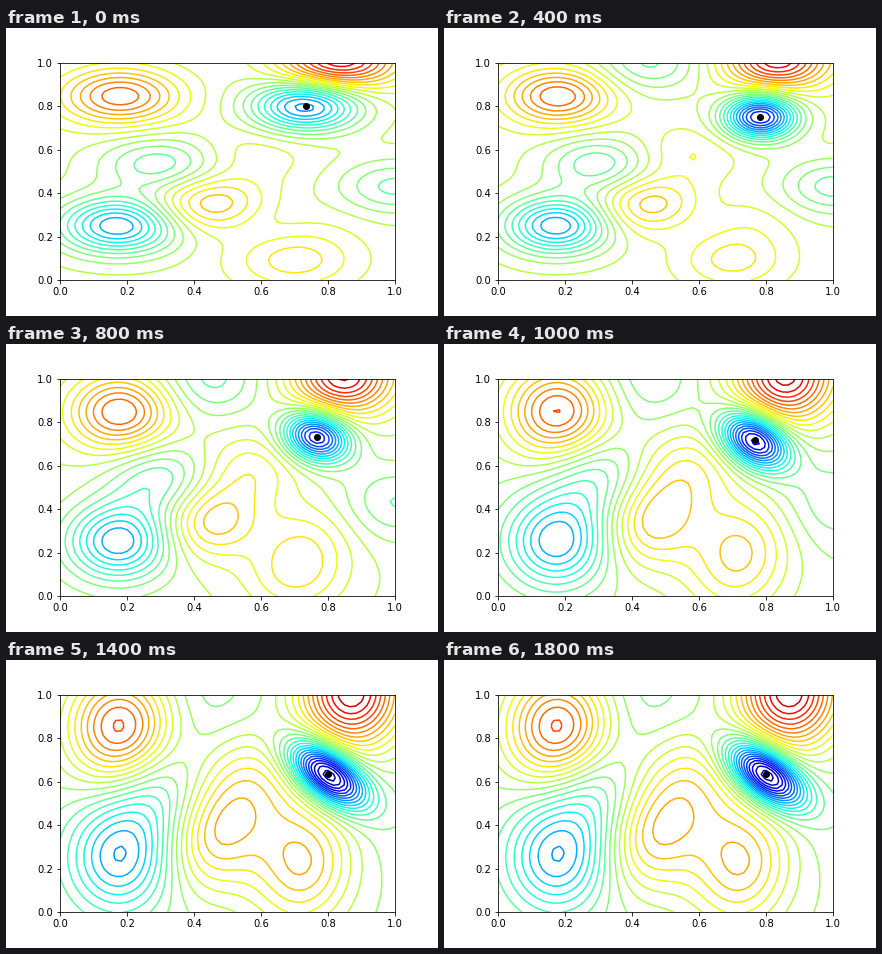
Recreate the animation shown at these times as a matplotlib script. Size 432 by 288 pixels, loop 2 s.

```python
import numpy as np
import matplotlib.pyplot as plt
from matplotlib.animation import FuncAnimation

plt.rcParams.update({"font.family": "DejaVu Sans", "font.size": 10})

FRAMES, INTERVAL = 10, 200
LEVELS = np.arange(31)

# x, y, then the height at the start, after the early and after the late phase
HILLS = np.array([
    (.18, .845, 24.7, 24.9, 25.1),
    (.46, .345, 21.5, 21.4, 21.9),
    (.57, .58, 18.4, 19.1, 21.3),
    (.60, .30, 18.6, 18.6, 21.4),
    (.70, .09, 20.6, 20.5, 20.8),
    (.72, .27, 17.9, 18.8, 22.3),
])
HOLLOWS = np.array([
    (.175, .25, 8.2, 8.2, 7.9),
    (.30, .53, 13.5, 13.3, 13.3),
    (1.0, .43, 13.7, 13.5, 14.8),
    (.45, 1.0, 17.4, 13.2, 14.8),
])
SAMPLES = np.vstack([HILLS, HOLLOWS])

# The lowest point hops over a grid of 60 x 60 cells.
HOPS = [0, 1, 2, 4, 6, 7]
LOW_X = [44, 47, 47, 46, 46, 48]
LOW_Y = [48, 45, 45, 44, 42, 38]
LOW = [7.7, 4.6, 3.9, 4.2, 1.3, 0.5]

axis = np.linspace(0, 1, 61)
X, Y = np.meshgrid(axis, axis)
GRID = np.column_stack([X.ravel(), Y.ravel()])


def ease(step, start, end):
    u = np.clip((step - start) / (end - start), 0, 1)
    return u * u * (3 - 2 * u)


def phases(step):
    return ease(step, .5, 2.5), ease(step, 2, 7)


def lowest(step):
    return [np.round(np.interp(step, HOPS, path)) / 60
            for path in (LOW_X, LOW_Y)]


def bumps(at, centres, sx, sy, shear):
    """Value of every centre's own Gaussian at every given point."""
    dx, dy = (at[:, None] - centres[None]).transpose(2, 0, 1)
    return np.exp(-0.5 * (((dx + shear * dy) / sx) ** 2 + (dy / sy) ** 2))


def surface(step):
    """Smooth surface through all samples, the summit and the lowest point."""
    early, late = phases(step)
    start, middle, end = SAMPLES[:, 2:].T
    heights = start + (middle - start) * early + (end - middle) * late
    heights = np.append(heights, [27.8 + 1.1 * late,
                                  np.interp(step, HOPS, LOW)])
    summit = .835 + .035 * late, 1.01
    centres = np.vstack([SAMPLES[:, :2], summit, lowest(step)])

    n = len(centres)
    sx = np.full(n, .124 - .018 * early)
    sy = np.full(n, .090 + .087 * late)
    shear = np.zeros(n)
    # The lowest point is narrower and leans over as it falls.
    sx[-1] = .112 - .045 * early
    sy[-1] = .080 - .012 * early + .038 * late
    shear[-1] = .4 * late

    mean = 17.4 - 1.7 * late
    shape = centres, sx, sy, shear
    weights = np.linalg.solve(bumps(centres, *shape), heights - mean)
    return mean + (bumps(GRID, *shape) @ weights).reshape(X.shape)


fig = plt.figure(figsize=(6, 4), dpi=72, facecolor="white")
fig.subplots_adjust(left=0.125, right=0.9, bottom=0.125, top=0.88)
ax = fig.add_subplot()
ax.set(xlim=(0, 1), ylim=(0, 1))
dot, = ax.plot([], [], "ko", markersize=6, zorder=4)
drawn = []


def update(step):
    while drawn:
        drawn.pop().remove()
    drawn.append(ax.contour(X, Y, surface(step), LEVELS, cmap="jet",
                            vmin=0, vmax=30, linewidths=1.5))
    x, y = lowest(step)
    dot.set_data([x], [y])
    return [dot]


anim = FuncAnimation(fig, update, frames=FRAMES, interval=INTERVAL,
                     init_func=lambda: update(0), repeat=True, repeat_delay=0)
plt.show()
```
